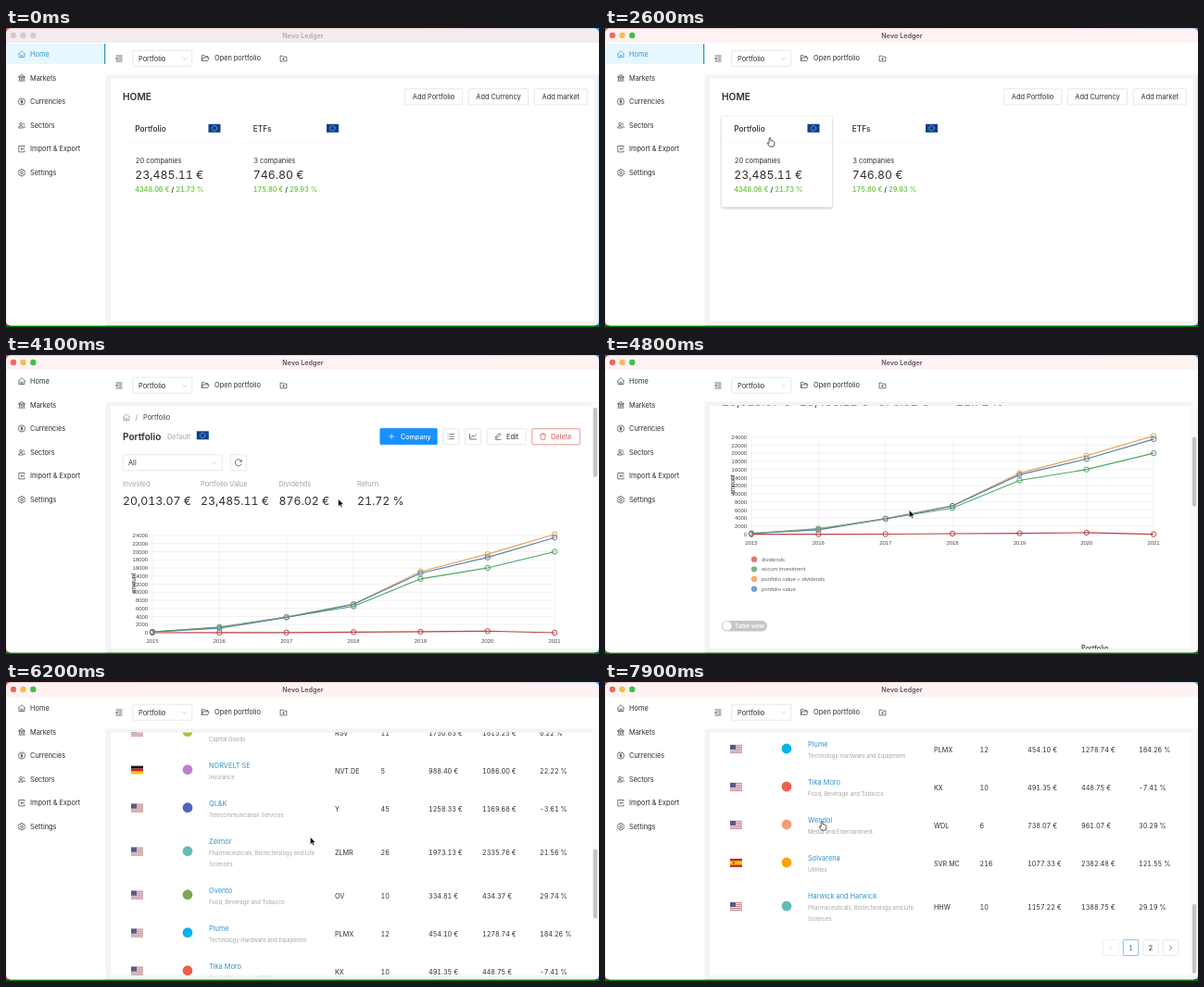
An HTML page that plays this animation: 640 by 323 pixels, repeating every 8 s.

```html
<!DOCTYPE html>
<html lang="en">
<head>
<meta charset="utf-8">
<title>Portfolio tracker</title>
<style>
  html, body { margin: 0; width: 100%; height: 100%; overflow: hidden; }
  svg { display: block; width: 100vw; height: 100vh; font-family: Inter, sans-serif; font-variant-numeric: tabular-nums; }
  text { white-space: pre; }
  .chart text { font-family: "Liberation Sans", Arial, sans-serif; }
  #hover { filter: drop-shadow(0 1px 1.6px rgba(0, 0, 0, .28)); }
</style>
</head>
<body>
<svg id="stage" viewBox="0 0 640 323"></svg>
<script>
const INK = '#2e2e2e', GRAY = '#a4a4a4', LINE = '#d9d9d9', BLUE = '#1890ff', LINK = '#3594c8',
      RED = '#d9534f', GREEN = '#6cc644';

// y is the vertical middle of the capitals
const text = (x, y, s, { size = 7.4, fill = INK, weight = 400, anchor = 'start' } = {}) =>
  `<text x="${x}" y="${y + size * .364}" font-size="${size}" fill="${fill}" font-weight="${weight}" text-anchor="${anchor}">${s.replace(/&/g, '&amp;')}</text>`;
const rect = (x, y, w, h, fill, more = '') =>
  `<rect x="${x}" y="${y}" width="${w}" height="${h}" fill="${fill}" ${more}/>`;
const box = (x1, y1, x2, y2, stroke = LINE, fill = '#fff') =>
  rect(x1 + .25, y1 + .25, x2 - x1 - .5, y2 - y1 - .5, fill, `rx="1" stroke="${stroke}" stroke-width=".6"`);
const circle = (x, y, r, fill, more = '') => `<circle cx="${x}" cy="${y}" r="${r}" fill="${fill}" ${more}/>`;
const path = (d, stroke = INK, width = .65) =>
  `<path d="${d}" fill="none" stroke="${stroke}" stroke-width="${width}"/>`;
const group = (body, attrs = '') => `<g ${attrs}>${body}</g>`;

// Icons are drawn around their own centre
const ICONS = {
  home: 'M-4 .2L0-3.6 4 .2M-2.9-.6V3.4H2.9V-.6M-.9 3.4V.9H.9V3.4',
  bank: 'M-3.6-1L0-3.5 3.6-1ZM-2.5-1V2.5M-.8-1V2.5M.8-1V2.5M2.5-1V2.5M-3.7 3.2H3.7',
  coin: 'M-3.6 0A3.6 3.6 0 1 1 3.6 0A3.6 3.6 0 1 1-3.6 0M1.1-1.1Q0-1.8-1-1T0 0 1 1-1.1 1.1M0-2.1V2.1',
  people: 'M-2.3-1.3A1.4 1.4 0 1 1 .5-1.3A1.4 1.4 0 1 1-2.3-1.3M-3.4 2.9Q-3.2.6-.9.6T1.6 2.9ZM1.4-2.7Q2.9-2.1 2.3-.4M2.2.6Q3.4 1 3.4 2.9',
  importing: 'M3-1.6V-3.2H-3.2V3.2H3V1.6M-1 0H3.2M.3-1L-1 0 .3 1',
  gear: 'M-1.3 0A1.3 1.3 0 1 1 1.3 0A1.3 1.3 0 1 1-1.3 0M-1-3.6H1L1.4-2.4 2.8-2.6 3.7-.9 2.9 0 3.7.9 2.8 2.6 1.4 2.4 1 3.6H-1L-1.4 2.4-2.8 2.6-3.7.9-2.9 0-3.7-.9-2.8-2.6-1.4-2.4Z',
  fold: 'M-3.5-3H3.5M-.5-1H3.5M-.5 1H3.5M-3.5 3H3.5M-3.5 0L-1.8-1.3V1.3Z',
  folderOpen: 'M-3.6 2.9V-2.9H-.9L0-1.9H2.6V-.6M-3.6 2.9L-2.2-.6H4L2.7 2.9Z',
  folderAdd: 'M-3.4-2.9H-.8L.2-1.8H3.4V2.9H-3.4ZM-1.2.6H1.2M0-.6V1.8',
  down: 'M-2.6-1.2L0 1.4 2.6-1.2',
  plus: 'M-3 0H3M0-3V3',
  list: 'M-1.8-2.6H3.6M-1.8 0H3.6M-1.8 2.6H3.6M-3.6-2.6H-2.8M-3.6 0H-2.8M-3.6 2.6H-2.8',
  chart: 'M-3.6-3V3H3.8M-2.2 1.3L-.4-1 .9.3 3.3-2.3',
  edit: 'M-3.3 3.4H3.5M-2.6 1.8L-2.3.2 1.6-3.4 2.9-2.2-1 1.6Z',
  trash: 'M-3.4-2H3.4M-1.3-2V-3.3H1.3V-2M-2.6-2L-2.2 3.4H2.2L2.6-2',
  reload: 'M3.3-1.4A3.5 3.5 0 1 0 3.4 1.1M3.6-3.2V-1.1H1.5',
  left: 'M1.3-2.6L-1.3 0 1.3 2.6',
  right: 'M-1.3-2.6L1.3 0-1.3 2.6',
};
const icon = (x, y, name, color = INK) =>
  group(path(ICONS[name], color), `transform="translate(${x} ${y})"`);

const FLAGS = {
  eu: rect(0, 0, 13, 9, '#0b3f94') +
    circle(6.5, 4.5, 2.7, 'none', 'stroke="#dfe0c8" stroke-width=".9" stroke-dasharray=".8 .61"'),
  us: rect(0, 0, 13, 9, '#eee6e8') +
    [0, 1, 2, 3, 4].map(i => rect(0, i * 2, 13, 1, '#c27f88')).join('') + rect(0, 0, 6, 5, '#555d87'),
  de: rect(0, 0, 13, 3, '#111') + rect(0, 3, 13, 3, '#d81e1e') + rect(0, 6, 13, 3, '#f8c918'),
  es: rect(0, 0, 13, 9, '#c8202c') + rect(0, 2.3, 13, 4.4, '#f9c414') + rect(2.6, 3.2, 2.2, 2.6, '#b5562c'),
};
const flag = (x, y, code) => group(FLAGS[code], `transform="translate(${x} ${y})"`);

function sidebar() {
  const items = [['home', 'Home'], ['bank', 'Markets'], ['coin', 'Currencies'],
    ['people', 'Sectors'], ['importing', 'Import & Export'], ['gear', 'Settings']];
  return rect(0, 16, 107.5, 305.5, '#fff') +
    items.map(([name, label], i) => icon(17, 28.3 + i * 25.6, name) + text(26, 28.3 + i * 25.6, label)).join('') +
    group(rect(.7, 17, 106.8, 22, '#e6f7ff') + rect(106, 17, 1.5, 22, LINK) +
      icon(17, 28.3, 'home', LINK) + text(26, 28.3, 'Home', { fill: LINK }), 'id="selected"');
}

function header() {
  return rect(107.5, 16, 532.5, 34.5, '#fff') + icon(122, 33, 'fold') +
    box(136.5, 24, 201, 41.5) + text(143, 33, 'Portfolio') + icon(193, 33, 'down', '#bfbfbf') +
    icon(215, 32.5, 'folderOpen') + text(225, 32.7, 'Open portfolio') + icon(299.5, 33, 'folderAdd');
}

function summaryCard(x, name, count, value, gain, percent) {
  return rect(x, 124.6, 119, .5, '#f2f2f2') +
    text(x + 13.3, 109, name, { size: 8.3, weight: 500 }) + flag(x + 92.5, 103.8, 'eu') +
    text(x + 13.7, 143, count + ' companies') + text(x + 13.3, 158.5, value + ' €', { size: 12.3 }) +
    text(x + 13.3, 174.3, `<tspan fill="${GREEN}">${gain} €</tspan> / <tspan fill="${GREEN}">${percent} %</tspan>`, { weight: 600, size: 7.3 });
}

function homePage() {
  const button = (x1, x2, label) => box(x1, 65.5, x2, 83) +
    text((x1 + x2) / 2, 74.2, label, { anchor: 'middle' });
  return text(126, 74, 'HOME', { size: 10.2, weight: 600 }) +
    button(430, 493, 'Add Portfolio') + button(499, 564, 'Add Currency') + button(570, 627.5, 'Add market') +
    rect(126, 95.5, 119, 98, '#fff', 'id="hover"') +
    summaryCard(126, 'Portfolio', 20, '23,485.11', '4348.06', '21.73') +
    summaryCard(253.5, 'ETFs', 3, '746.80', '175.80', '29.93');
}

function pageTop() {
  const stats = [[126, 'Invested', '20,013.07 €'], [210, 'Portfolio Value', '23,485.11 €'],
    [294.5, 'Dividends', '876.02 €'], [379, 'Return', '21.72 %']];
  return icon(130, 67.3, 'home', '#888') + text(139.5, 67.3, '/', { fill: '#888' }) + text(148, 67.3, 'Portfolio', { fill: '#444' }) +
    text(126, 88, 'Portfolio', { size: 10.1, weight: 600 }) + text(174, 88, 'Default', { fill: GRAY }) + flag(205.8, 82.3, 'eu') +
    box(403.5, 79, 465.5, 97, BLUE, BLUE) + icon(416, 88, 'plus', '#fff') +
    text(426, 88, 'Company', { fill: '#fff', weight: 500, size: 7.1 }) +
    box(471.5, 79.5, 489, 97) + icon(480.2, 88, 'list') + box(495.5, 79.5, 513, 97) + icon(504.2, 88, 'chart') +
    box(519, 79.5, 561.5, 97) + icon(531, 88, 'edit') + text(540, 88, 'Edit') +
    box(567.5, 79.5, 619.5, 97, RED) + icon(579.5, 88, 'trash', RED) + text(588, 88, 'Delete', { fill: RED }) +
    box(126, 107.5, 233.5, 125) + text(132, 116.3, 'All') + icon(224.5, 116.5, 'down', '#bfbfbf') +
    box(242, 107.5, 259.5, 125) + icon(250.7, 116.3, 'reload') +
    stats.map(([x, label, value]) => text(x, 139.3, label, { fill: GRAY }) + text(x, 157.3, value, { size: 12.3 })).join('');
}

function chart() {
  const px = i => 158 + i * 72.35, py = v => 300 - v * 4.375;
  const label = { size: 5.9, fill: '#444' };
  const series = [
    ['dividends', '#bd4545', '#e0786f', [0, .02, .04, .15, .25, .4, 0]],
    ['accum investment', '#4fa565', '#74bd85', [.2, 1.4, 3.85, 6.5, 13.3, 16, 20]],
    ['portfolio value + dividends', '#e5a157', '#f0b163', [.2, 1.2, 3.85, 7.05, 15.1, 19.4, 24.3]],
    ['portfolio value', '#5583ab', '#74a5cf', [.2, 1.1, 3.8, 7, 14.7, 18.6, 23.5]],
  ];
  let out = '';
  for (let v = 0; v <= 24; v += 2)
    out += path(`M158 ${py(v)}H592`, '#e3e3e3', .5) + text(153, py(v), String(v * 1000), { ...label, anchor: 'end' });
  for (let i = 0; i < 7; i++)
    out += path(`M${px(i)} 195V300`, '#e3e3e3', .5) + text(px(i), 308.7, String(2015 + i), { ...label, anchor: 'middle' });
  out += group(text(0, 0, 'amount', { size: 6.4, anchor: 'middle' }), 'transform="translate(138 246.5) rotate(-90)"');
  for (const [, color, , values] of series)
    out += path('M' + values.map((v, i) => `${px(i)} ${py(v)}`).join('L'), color, 1.15);
  for (const [, color, , values] of series)
    out += values.map((v, i) => circle(px(i), py(v), 2.7, 'none', `stroke="${color}" stroke-width="1"`)).join('');
  series.forEach(([name, , color], i) => {
    const y = 327 + i * 10.67;
    out += circle(161, y, 3.2, color) + text(169, y, name, { ...label, fill: '#666' });
  });
  return group(out, 'class="chart"');
}

function table() {
  const sorter = (x, y) => `<path d="M${x - 2} ${y - .9}h4l-2-2.6ZM${x - 2} ${y + .9}h4l-2 2.6Z" fill="#bfbfbf"/>`;
  const head = [[134.5, 'Country', 170], [219, 'Name', 247], [355, 'Ticker', 384], [404.5, 'Shares', 435],
    [456, 'Invested', 493], [514, '', 556], [576, 'Return', 607]];
  const bold = { weight: 500, size: 7.3 };
  const pharma = 'Pharmaceuticals, Biotechnology and Life|Sciences';
  const rows = [
    ['us', '#b9bb3f', 'R7', 'Capital Goods', 'RSV', 11, '1750.83', '1815.25', '6.22'],
    ['de', '#c07fce', 'NORVELT SE', 'Insurance', 'NVT.DE', 5, '988.40', '1086.00', '22.22'],
    ['us', '#4c66ba', 'QL&K', 'Telecommunication Services', 'Y', 45, '1258.33', '1169.68', '-3.61'],
    ['us', '#62bcb8', 'Zelmor', pharma, 'ZLMR', 26, '1973.13', '2335.76', '21.56'],
    ['us', '#7fa850', 'Ovento', 'Food, Beverage and Tobacco', 'OV', 10, '334.81', '434.37', '29.74'],
    ['us', '#06b1ee', 'Plume', 'Technology Hardware and Equipment', 'PLMX', 12, '454.10', '1278.74', '184.26'],
    ['us', '#ee5f4d', 'Tika Moro', 'Food, Beverage and Tobacco', 'KX', 10, '491.35', '448.75', '-7.41'],
    ['us', '#f29d7c', 'Wendol', 'Media and Entertainment', 'WDL', 6, '738.07', '961.07', '30.29'],
    ['es', '#f6a50a', 'Solvarena', 'Utilities', 'SVR.MC', 216, '1077.33', '2382.48', '121.55'],
    ['us', '#62bcb8', 'Harwick and Harwick', pharma, 'HHW', 10, '1157.22', '1388.75', '29.19'],
  ];
  let out = rect(126, 393.3, 49, 11.5, '#c6c6c6', 'rx="5.75"') + circle(131.8, 399, 4.8, '#fff') +
    text(140, 399, 'Table view', { size: 6.2, fill: '#fff', weight: 600 });
  for (const [x, label, sortX] of head) out += text(x, 429.3, label, bold) + sorter(sortX, 429.5);
  out += text(514, 423, 'Portfolio', bold) + text(514, 435, 'value', bold) + rect(126, 449.2, 493, .5, '#f3f3f3');

  let top = 449.5;
  for (const [code, color, name, sector, ticker, shares, invested, value, gain] of rows) {
    const lines = sector.split('|'), height = 29 + 12 * lines.length, mid = top + height / 2;
    const first = mid - 6 * lines.length;
    out += flag(135, mid - 5.1, code) + circle(196, mid - 1, 5.4, color) +
      text(219, first + .3, name, { fill: LINK }) +
      lines.map((s, i) => text(219, first + 12.7 + i * 12, s, { size: 5.95, fill: GRAY })).join('') +
      [[355, ticker], [404.5, String(shares)], [456, invested + ' €'], [514, value + ' €'], [576, gain + ' %']]
        .map(([x, s]) => text(x, mid + .7, s, { size: 7.2 })).join('');
    top += height;
    out += rect(126, top, 493, .5, '#fafafa');
  }
  const page = (x, color) => box(x, 892.3, x + 17, 909.7, color);
  return out + page(537.5, '#e6e6e6') + icon(546, 901, 'left', '#c8c8c8') +
    page(559, LINK) + text(567.5, 901, '1', { fill: LINK, anchor: 'middle', weight: 500 }) +
    page(580.5) + text(589, 901, '2', { anchor: 'middle' }) + page(602) + icon(610.5, 901, 'right');
}

const stage = document.getElementById('stage');
stage.innerHTML = `
  <defs>
    <linearGradient id="wall"><stop stop-color="#d0545c"/><stop offset=".75" stop-color="#dd8a90"/><stop offset="1" stop-color="#3f9be0"/></linearGradient>
    <clipPath id="window">${rect(.3, .6, 639.5, 320.9, '#000', 'rx="5"')}</clipPath>
    <clipPath id="view">${rect(113, 54.5, 527, 263, '#000')}</clipPath>
  </defs>
  ${rect(0, 0, 640, 323, 'url(#wall)')}${rect(0, 321, 640, 2, '#007a08')}
  ${group(
    rect(0, 0, 640, 323, '#f3f4f5') + rect(0, 0, 640, 16, '#fff2f2', 'id="bar"') +
    [8, 18.5, 29.3].map(x => circle(x, 8, 3.2, '#d6cacc', 'class="light"')).join('') +
    group(text(320.5, 8, 'Nevo Ledger', { size: 7.2, weight: 600, anchor: 'middle', fill: 'currentColor' }), 'id="title"') +
    sidebar() + header() +
    rect(113, 55, 521.5, 262, '#fff') +
    group(homePage(), 'id="home"') +
    group(rect(632.5, 50.5, 8, 270.5, '#fafafa') +
      group(group(pageTop() + chart() + table(), 'id="content"'), 'clip-path="url(#view)"') +
      rect(633.8, 0, 4.4, 75, '#c4c4c4', 'rx="2.2" id="thumb"'), 'id="portfolio"'),
    'clip-path="url(#window)"')}
  <g id="cursor">
    <path id="arrow" d="M0 0V8.2L1.9 6.5 3.2 9.3 4.5 8.7 3.3 5.9H5.9Z" fill="#000" stroke="#fff" stroke-width=".6"/>
    <path id="hand" d="M-.9.9A.9.9 0 0 1 .9.9V3.2Q4.8 3.3 4.8 5V7.2Q4.6 8.6 3.9 9.6H-.3Q-1.6 7.6-3 5.9-2.4 4.8-.9 6Z" fill="#fff" stroke="#222" stroke-width=".75"/>
  </g>`;

const el = id => document.getElementById(id);
const lights = [...stage.querySelectorAll('.light')];
const clamp = v => Math.max(0, Math.min(1, v));
const smooth = v => v * v * (3 - 2 * v);
const show = (id, on) => el(id).setAttribute('display', on ? 'inline' : 'none');

// Keys are [time, ...values]
function track(keys, t, ease = v => v) {
  const next = keys.findIndex(k => k[0] > t);
  if (next === 0) return keys[0].slice(1);
  if (next < 0) return keys[keys.length - 1].slice(1);
  const a = keys[next - 1], b = keys[next], p = ease((t - a[0]) / (b[0] - a[0]));
  return a.slice(1).map((v, i) => v + (b[i + 1] - v) * p);
}

const POINTER = [[500, 343, 293], [1300, 162, 215], [1700, 162, 215], [2300, 178, 118.5], [3000, 178, 118.5],
  [4000, 358.5, 155.5], [4200, 358.5, 155.5], [4700, 328.3, 167.5], [6800, 328.3, 167.5], [7300, 241, 234], [7900, 234, 150.5]];
const SCROLL = [[4200, 0], [4500, 32], [4800, 106], [5100, 205], [5400, 270], [5500, 270], [5600, 274],
  [6200, 415], [6500, 500], [6900, 590], [7300, 614]];
const ACTIVATE = 100, HOVER = 1850, OPEN = 3000, LINK_HOVER = 7700;

function draw(t) {
  const active = t >= ACTIVATE, opened = t >= OPEN;
  const colors = active ? ['#ee6a5f', '#f5bd4f', '#3cc24b'] : Array(3).fill('#d6cacc');
  lights.forEach((light, i) => light.setAttribute('fill', colors[i]));
  el('bar').setAttribute('fill', active ? '#fff2f2' : '#f4ebed');
  el('title').style.color = active ? '#5c5456' : '#b5abad';

  show('home', !opened);
  show('portfolio', opened);
  el('selected').setAttribute('opacity', 1 - clamp((t - OPEN) / 300));
  el('hover').setAttribute('opacity', clamp((t - HOVER) / 300));

  const [scroll] = track(SCROLL, t);
  el('content').setAttribute('transform', `translate(0 ${-scroll})`);
  el('thumb').setAttribute('y', 56.8 + scroll * .298);

  const [x, y] = track(POINTER, t, smooth);
  const hand = t >= HOVER && !opened || t >= LINK_HOVER;
  show('cursor', t >= 500);
  el('cursor').setAttribute('transform', `translate(${x} ${y})`);
  show('hand', hand);
  show('arrow', !hand);
}

function tick() {
  draw(performance.now() % 8000);
  requestAnimationFrame(tick);
}
tick();
</script>
</body>
</html>
```
